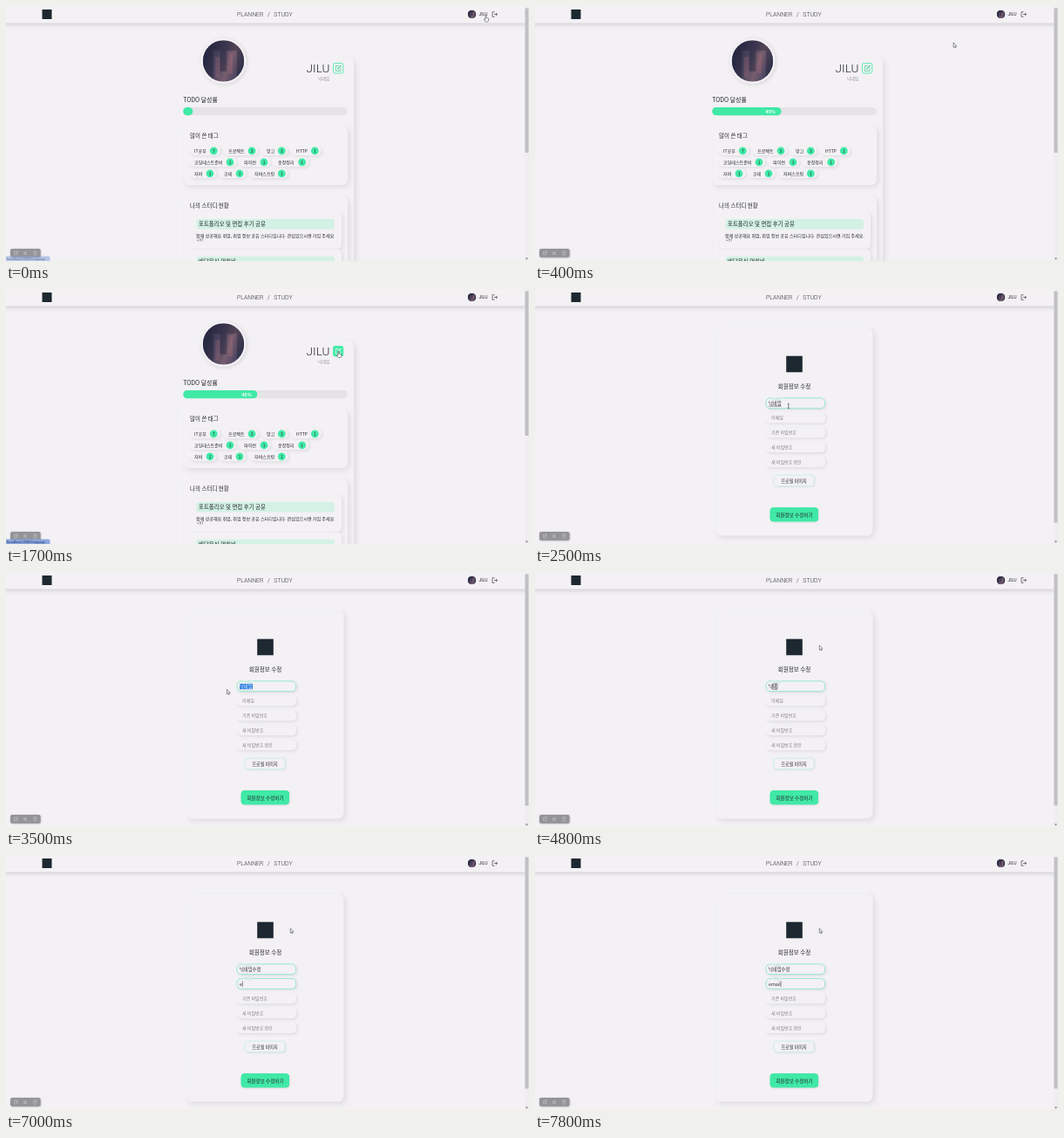
Animation, 600 px wide and 292 px high, one loop 8 s. Source, as an HTML page with a canvas:

```html
<!DOCTYPE html>
<html lang="ko">
<head>
<meta charset="utf-8">
<title>회원정보 수정</title>
<style>
html, body { margin: 0; width: 100%; height: 100%; overflow: hidden; background: #f3f1f4; }
canvas { display: block; width: 600px; height: 292px; }
</style>
</head>
<body>
<canvas id="stage"></canvas>
<script>
const W = 600, H = 292, LOOP = 8000, STEP = 100;
const GREEN = '#40e9a6', INK = '#26262c', BG = '#f3f1f4', GREY = '#85838a';
const KR = '"Noto Sans CJK KR", "Noto Sans CJK", sans-serif';
const LATIN = 'Roboto, sans-serif';
const USER = 'JILU';
const PAGE_SWITCH = 1900;

const canvas = document.getElementById('stage');
const g = canvas.getContext('2d');
const dpr = window.devicePixelRatio || 1;
canvas.width = W * dpr;
canvas.height = H * dpr;

function box(x, y, w, h, r, fill, stroke, line = 0.7) {
  g.beginPath();
  g.roundRect(x, y, w, h, r);
  if (fill) { g.fillStyle = fill; g.fill(); }
  if (stroke) { g.strokeStyle = stroke; g.lineWidth = line; g.stroke(); }
}

function disc(x, y, r, fill) {
  g.beginPath();
  g.arc(x, y, r, 0, Math.PI * 2);
  g.fillStyle = fill;
  g.fill();
}

function shadow(color, offset, blur) {
  g.shadowColor = color;
  g.shadowOffsetX = g.shadowOffsetY = offset * dpr;
  g.shadowBlur = blur * dpr;
}

// Raised panel: light from the top left, shade to the bottom right
function raised(x, y, w, h, r, depth = 2, fill = BG) {
  g.save();
  shadow('rgba(255,255,255,.4)', -depth, depth * 2.5);
  box(x, y, w, h, r, fill);
  shadow('rgba(70,60,90,.13)', depth, depth * 3);
  box(x, y, w, h, r, fill);
  g.restore();
}

function text(str, x, y, size, { color = INK, weight = 400, align = 'left', font = KR } = {}) {
  g.font = `${weight} ${size}px ${font}`;
  g.fillStyle = color;
  g.textAlign = align;
  g.textBaseline = 'middle';
  g.fillText(str, x, y);
}

function path(points, color, width) {
  g.beginPath();
  points.forEach(([x, y]) => g.lineTo(x, y));
  g.strokeStyle = color;
  g.lineWidth = width;
  g.stroke();
}

// Night skyline in a round crop
function avatar(x, y, r) {
  g.save();
  g.beginPath();
  g.arc(x, y, r, 0, Math.PI * 2);
  g.clip();
  const sky = g.createLinearGradient(x - r, y - r * 0.4, x + r, y + r * 0.4);
  sky.addColorStop(0, '#292c4a');
  sky.addColorStop(0.45, '#504862');
  sky.addColorStop(0.65, '#765d6e');
  sky.addColorStop(1, '#353a5a');
  g.fillStyle = sky;
  g.fillRect(x - r, y - r, r * 2, r * 2);
  g.fillStyle = 'rgba(24,25,44,.35)';
  g.fillRect(x - r, y - r, r * 2, r * 0.5);
  g.fillRect(x - r, y - r * 0.5, r * 0.5, r * 1.5);
  g.fillRect(x - r * 0.15, y - r * 0.5, r * 0.3, r);
  g.fillRect(x + r * 0.65, y - r * 0.5, r * 0.35, r * 1.5);
  g.fillStyle = 'rgba(190,112,122,.25)';
  g.fillRect(x - r * 0.4, y - r * 0.2, r * 0.22, r);
  g.fillRect(x + r * 0.25, y - r * 0.4, r * 0.2, r);
  g.restore();
}

function header() {
  g.save();
  shadow('rgba(70,60,90,.22)', 1, 5);
  g.fillStyle = BG;
  g.fillRect(-10, -10, W + 20, 29.6);
  g.restore();
  box(41.5, 4, 11, 11, 0, '#1d2831');
  const nav = { font: LATIN, weight: 300, color: '#333338' };
  text('PLANNER', 265, 10, 6.9, nav);
  text('/', 300, 10, 6.9, nav);
  text('STUDY', 307.3, 10, 6.9, nav);
  avatar(534.5, 9.5, 4.8);
  text(USER, 542.5, 10, 5, { font: LATIN });
  path([[560.5, 6.7], [558, 6.7], [558, 12.3], [560.5, 12.3]], '#55535a', 0.8);
  path([[560, 9.5], [563.7, 9.5]], '#55535a', 0.8);
  path([[562, 7.8], [563.8, 9.5], [562, 11.2]], '#55535a', 0.8);
}

function scrollbar(end) {
  g.fillStyle = '#efedf0';
  g.fillRect(595, 0, 5, H);
  box(595.5, 2.5, 4, end - 2.5, 0, '#c0bfc2');
  g.beginPath();
  g.moveTo(596, 288.5);
  g.lineTo(599, 288.5);
  g.lineTo(597.5, 290.5);
  g.fillStyle = '#77757b';
  g.fill();
}

function recorder() {
  g.save();
  shadow('rgba(0,0,0,.3)', 0.5, 2);
  box(5, 278, 34.5, 9.7, 2, '#949397');
  g.restore();
  const c = '#c9c8cc';
  box(9.5, 281, 3.5, 3.8, 0.5, null, c, 0.6);
  path([[11, 283.3], [13.6, 280.6]], c, 0.6);
  path([[21, 281], [21, 285]], c, 0.9);
  path([[23, 281], [23, 285]], c, 0.9);
  box(32, 282, 3, 3.2, 0.4, null, c, 0.6);
  path([[31.3, 281], [35.7, 281]], c, 0.6);
}

function linkStatus(alpha) {
  g.save();
  g.globalAlpha = alpha;
  box(0, 286.5, 50.5, 6, [0, 1.5, 0, 0], '#87a3df');
  text('localhost:3000/mypage', 1, 289.5, 4.2, { color: '#26395f', font: LATIN });
  g.restore();
}

function editButton(hover) {
  box(375.5, 65.5, 11.3, 11.5, 2, hover ? GREEN : '#eef5f2', GREEN, 0.8);
  const c = hover ? '#fff' : '#39c890';
  path([[381.5, 68.6], [378.3, 68.6], [378.3, 74.3], [384, 74.3], [384, 71.5]], c, 0.7);
  path([[380.4, 72.3], [384.4, 68.2]], c, 1.1);
}

// Each tag: label, count, label x, badge x
const TAGS = [
  [['IT공부', 7, 216, 238.3], ['프로젝트', 3, 255, 282], ['망고', 3, 299, 316.3], ['HTTP', 1, 333, 354.3]],
  [['코딩테스트준비', 1, 216, 257], ['파이썬', 1, 273, 296], ['옷장정리', 1, 312, 339.7]],
  [['자바', 1, 216, 234], ['코테', 1, 250, 268], ['자바스프링', 1, 285, 316.3]]
];

function tag([label, count, x, badge], y) {
  raised(x - 5.5, y - 5.3, badge - x + 13, 10.6, 5.3, 1.2);
  text(label, x, y, 5.05, { weight: 500 });
  disc(badge, y, 4.4, GREEN);
  text(count, badge, y + 0.2, 4.8, { align: 'center' });
}

function progress(t) {
  const k = Math.min(t / 700, 1);
  const w = 11 + 74 * (1 - (1 - k) ** 3);
  box(203.3, 116, 188.5, 9.3, 4.6, '#e5e3e6');
  box(203.3, 116, w, 9.3, 4.6, GREEN);
  if (w > 24) text('45%', 203.3 + w - 6.5, 120.8, 5.3, { color: '#fff', weight: 700, align: 'right' });
}

function studyCard(y, title) {
  raised(211, y, 174, 42, 5, 1.5);
  box(218.5, y + 8, 158.5, 11.5, 3, '#d3f1e4');
  text(title, 221, y + 13.7, 6.45);
}

function profilePage(t) {
  raised(196, 59, 203, 260, 7, 2.2);
  g.save();
  shadow('rgba(70,60,90,.16)', 1, 4);
  disc(249.5, 63, 26, '#f4f2f5');
  g.restore();
  avatar(249.5, 63, 23.7);
  text(USER, 371.3, 72.3, 13.5, { font: LATIN, weight: 300, align: 'right' });
  text('닉네임', 371.3, 82.7, 4.9, { color: '#949298', align: 'right' });
  editButton(t >= 1000);
  text('TODO 달성률', 203.3, 107.8, 6.9);
  progress(t);

  raised(204, 138, 188, 67, 6);
  text('많이 쓴 태그', 211, 148.3, 6.5);
  TAGS.forEach((row, i) => row.forEach(item => tag(item, 165.8 + i * 13)));

  raised(204, 218, 188, 100, 6);
  text('나의 스터디 현황', 211, 228.3, 6.5);
  studyCard(236, '포트폴리오 및 면접 후기 공유');
  text('함께 성공해요 취업, 취업 정보 공유 스터디입니다. 관심있으시면 가입 주세요', 218, 263, 5.1);
  text('~!!!', 218.5, 268.2, 5);
  studyCard(278.7, '배달음식 먹회비');
}

const FIELD_Y = [124.7, 141.3, 158.2, 175, 192];
const NICK_KEYS = ['ㄴ', '니', '닉', '닉ㄴ', '닉네', '닉넹', '닉네이', '닉네임',
  '닉네임ㅅ', '닉네임수', '닉네임숮', '닉네임수저', '닉네임수정'];
const MAIL_TIMES = [7000, 7400, 7500, 7600, 7800];

function field(y, placeholder, value, focused, label) {
  raised(265, y, 68, 12.1, 4.5, 1.1);
  if (!label) {
    text(placeholder, 271, y + 6.2, 5.05, { color: GREY });
    return;
  }
  if (focused) box(265, y + 0.2, 67.5, 11.8, 4.5, null, '#7be6bf', 0.75);
  g.fillStyle = BG;
  g.fillRect(272, y - 0.7, 10.5, 1.6);
  text(label, 272.5, y + 0.7, 3.4, { color: '#7fdcb9' });
  if (value) text(value, 268, y + 6.5, 5.3);
}

function caret(x, y) {
  g.fillStyle = INK;
  g.fillRect(x, y + 3.2, 0.5, 6.4);
}

function textWidth(str) {
  g.font = `400 5.3px ${KR}`;
  return g.measureText(str).width;
}

function nickname(t) {
  const y = FIELD_Y[0];
  const typed = Math.min(Math.floor((t - 4300) / 125), NICK_KEYS.length - 1);
  const value = t < 4300 ? '닉네임' : NICK_KEYS[typed];
  field(y, '', value, t >= 2300, '닉네임');
  const w = textWidth(value);
  if (t < 2800) {
    path([[268, y + 9.5], [268 + w, y + 9.5]], '#3c3b42', 0.5);
  } else if (t < 4300) {
    const from = Math.max(268, 283 - (t - 2700) / 300 * 15);
    g.save();
    g.beginPath();
    g.rect(from, y + 3, 283.2 - from, 6.8);
    g.clip();
    box(from, y + 3, 15.3, 6.8, 0, '#2b7de0');
    text(value, 268, y + 6.5, 5.3, { color: '#fff' });
    g.restore();
  } else if (t < 6400) {
    box(268 + w - 5, y + 3.4, 5.2, 6.2, 0, null, '#2b2a30', 0.5);
  }
}

function email(t) {
  const y = FIELD_Y[1], focused = t >= 6500;
  const value = 'email'.slice(0, MAIL_TIMES.filter(at => t >= at).length);
  field(y, '이메일', value, focused, focused && '이메일');
  if (focused) caret(268 + textWidth(value), y);
}

function editPage(t) {
  raised(207.5, 44.5, 180, 238, 7, 2.2);
  box(288.2, 76.7, 18.6, 18.6, 0, '#1d2831');
  text('회원정보 수정', 297.5, 111.5, 6.5, { align: 'center' });
  nickname(t);
  email(t);
  ['기존 비밀번호', '새 비밀번호', '새 비밀번호 확인'].forEach((p, i) => field(FIELD_Y[i + 2], p));
  raised(273.7, 213, 46.6, 12.8, 4, 0.8);
  box(273.7, 213, 46.6, 12.8, 4, null, '#bdf0db', 0.7);
  text('프로필 이미지', 297, 219.6, 5.15, { align: 'center', weight: 500 });
  raised(269.7, 250.2, 55.2, 16, 4, 0.8, GREEN);
  text('회원정보 수정하기', 297.4, 258.4, 5.6, { align: 'center', weight: 500 });
}

// Pointer track: time, x, y
const TRACK = [
  [0, 550, 10.5], [100, 546, 13], [400, 480, 42], [800, 398.7, 67.2], [900, 387, 71],
  [1100, 381, 71], [1900, 381, 71], [2300, 290.8, 134], [2700, 290.8, 134],
  [3100, 253.5, 134.5], [3500, 253.5, 134.5], [3800, 326.3, 84], [LOOP, 326.3, 84]
];

function pointerAt(t) {
  const i = TRACK.findIndex(p => p[0] > t);
  const [t0, x0, y0] = TRACK[i - 1], [t1, x1, y1] = TRACK[i];
  const k = (t - t0) / (t1 - t0);
  return [x0 + (x1 - x0) * k, y0 + (y1 - y0) * k];
}

function shape(x, y, points) {
  g.beginPath();
  points.forEach(([dx, dy]) => g.lineTo(x + dx, y + dy));
  g.closePath();
  g.fillStyle = '#fff';
  g.fill();
  g.strokeStyle = '#3a393f';
  g.lineWidth = 0.55;
  g.lineJoin = 'round';
  g.stroke();
}

const ARROW = [[0, 0], [0, 5.3], [1.2, 4.2], [2, 6], [2.9, 5.6], [2.1, 3.9], [3.7, 3.8]];
const HAND = [[0, 0.3], [0.9, 0.3], [1, 3], [3.7, 3.8], [3.5, 6.3], [2.8, 7.5], [0.2, 7.5],
  [-1.7, 4.8], [-1, 4.1], [0, 5]];

function pointer(t) {
  const [x, y] = pointerAt(t);
  const onLink = t < 100 || (t >= 1000 && t < PAGE_SWITCH);
  const onField = t >= 2300 && x > 265 && x < 333 && y > 124 && y < 138;
  if (onField) {
    path([[x, y - 2.5], [x, y + 2.5]], INK, 0.6);
    path([[x - 1, y - 2.5], [x + 1, y - 2.5]], INK, 0.5);
    path([[x - 1, y + 2.5], [x + 1, y + 2.5]], INK, 0.5);
  } else {
    shape(x, y, onLink ? HAND : ARROW);
  }
}

function draw(t) {
  g.setTransform(dpr, 0, 0, dpr, 0, 0);
  g.fillStyle = BG;
  g.fillRect(0, 0, W, H);
  const profile = t < PAGE_SWITCH;
  if (profile) profilePage(t); else editPage(t);
  header();
  scrollbar(profile ? 168 : 267.5);
  recorder();
  if (t < 200) linkStatus(0.55);
  else if (t >= 1000 && profile) linkStatus(0.95);
  pointer(t);
}

const start = performance.now();
function tick() {
  const t = (performance.now() - start) % LOOP;
  draw(Math.floor(t / STEP) * STEP);
  requestAnimationFrame(tick);
}
tick();
</script>
</body>
</html>
```
